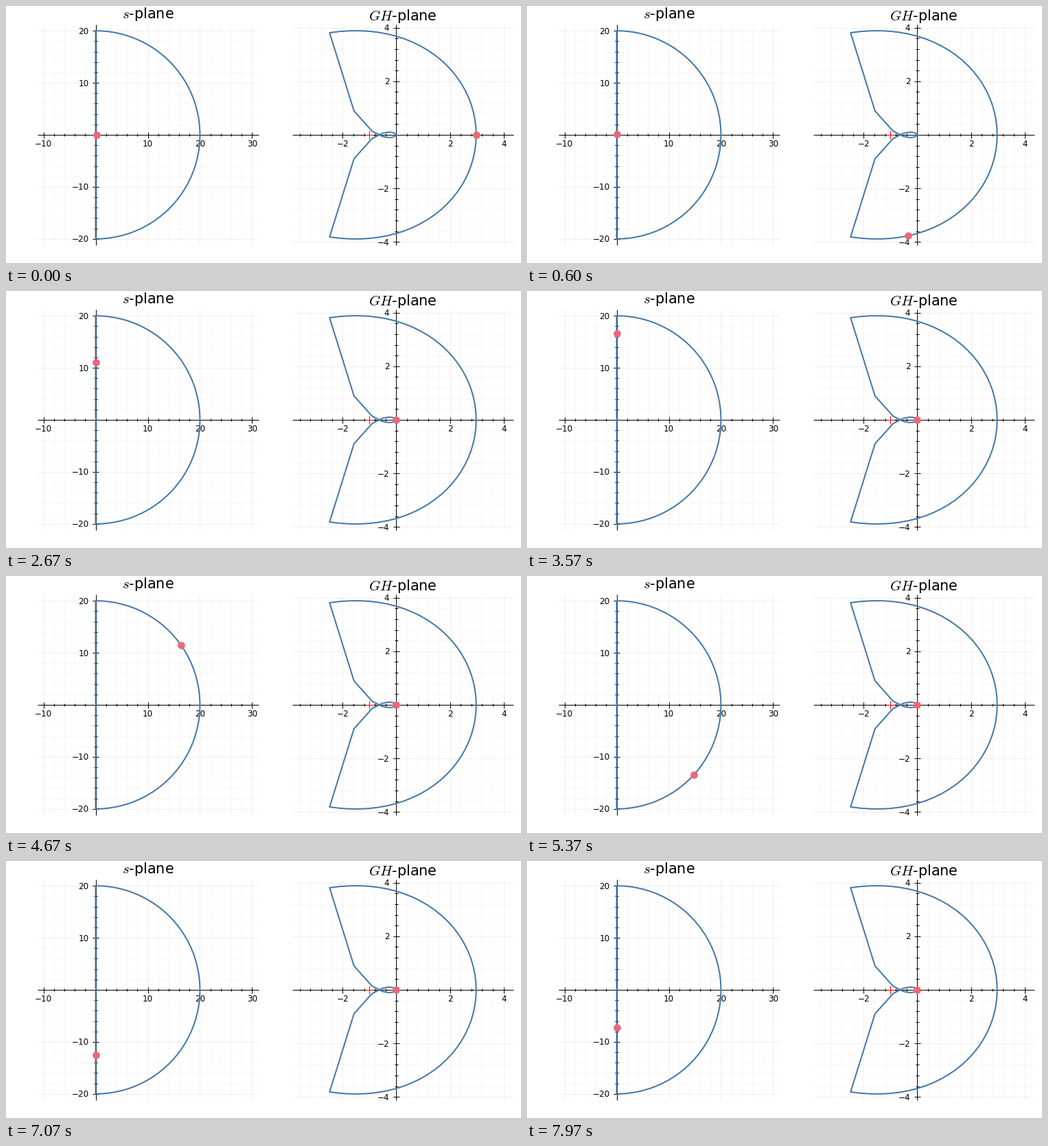
These frames come from a looping animation (750 px wide and 375 px high, 8000 ms). A matplotlib script:

```python
import numpy as np
import matplotlib.pyplot as plt
from matplotlib.animation import FuncAnimation

W, H, DPI = 750, 375, 100
PX = 72 / DPI                 # points per pixel
FRAMES, LOOP_MS = 240, 8000
BLUE, PINK = "#4477AA", "#EE6677"
R_SMALL, R_BIG = 0.2, 20

plt.rcParams.update({"font.family": "DejaVu Sans", "mathtext.fontset": "cm"})


def arc(r, start, stop, n):
    return r * np.exp(1j * np.radians(np.linspace(start, stop, n)))


def rise(start, stop):
    return 1j * np.linspace(start, stop, 50)


def loop_gain(s):
    return 1 / (s * (s + 1) * (2 * s + 1))


class Plane:
    """Square plot with axes through the origin, placed in pixels."""

    def __init__(self, ax, origin, scale, left, step, title, baseline):
        self.ax, self.scale, self.step = ax, scale, step
        self.x0, self.y0 = origin
        self.left, self.right = left, left + 321.9
        self.top, self.bottom = self.y0 - 160.95, self.y0 + 160.95
        self.draw_axes()
        ax.text((self.left + self.right) / 2, baseline, title,
                fontsize=20.8 * PX, ha="center", va="baseline")

    def to_px(self, z):
        return self.x0 + self.scale * np.real(z), self.y0 - self.scale * np.imag(z)

    def line(self, x, y, width=1.0, color="black", **kw):
        self.ax.plot(x, y, color=color, lw=width * PX,
                     solid_capstyle="butt", **kw)

    def ticks(self, low, high):
        """Yield (value, is_major) for each tick inside the limits."""
        for k in range(-20, 21):
            value = k * self.step / 5
            if k and low <= value * self.scale <= high:
                yield value, k % 5 == 0

    def label(self, x, y, value, **kw):
        text = f"{value:.0f}".replace("-", "\u2212")
        self.ax.text(x, y, text, fontsize=12 * PX, zorder=2.5, **kw)

    def draw_axes(self):
        for v, major in self.ticks(self.left - self.x0, self.right - self.x0):
            x = self.x0 + v * self.scale
            half = 4.5 if major else 2.4
            self.line([x, x], [self.top, self.bottom], 0.6,
                      alpha=0.1 if major else 0.05, zorder=1)
            self.line([x, x], [self.y0 - half, self.y0 + half], zorder=2)
            if major:
                self.label(x, 205.4, v, ha="center", va="baseline")
        for v, major in self.ticks(-160.95, 160.95):
            y = self.y0 - v * self.scale
            half = 4.5 if major else 2.4
            self.line([self.left, self.right], [y, y], 0.6,
                      alpha=0.1 if major else 0.05, zorder=1)
            self.line([self.x0 - half, self.x0 + half], [y, y], zorder=2)
            if major:
                self.label(self.x0 - 10, y + 4.5, v, ha="right", va="baseline")
        self.line([self.left, self.right], [self.y0, self.y0], zorder=2)
        self.line([self.x0, self.x0], [self.top, self.bottom], zorder=2)

    def curve(self, z):
        self.line(*self.to_px(z), 2, BLUE, zorder=3, solid_joinstyle="round")

    def dot(self):
        return self.ax.plot([], [], "o", color=PINK, ms=10.6 * PX, mew=0,
                            zorder=5)[0]


contour = np.concatenate([
    arc(R_SMALL, 0, 90, 25),
    rise(R_SMALL, R_BIG / 2),
    rise(R_BIG / 2, R_BIG),
    arc(R_BIG, 90, -90, 50),
    rise(-R_BIG, -R_BIG / 2),
    rise(-R_BIG / 2, -R_SMALL),
    arc(R_SMALL, -90, 0, 25),
])
image = loop_gain(contour)

fig = plt.figure(figsize=(W / DPI, H / DPI), dpi=DPI, facecolor="white")
ax = fig.add_axes([0, 0, 1, 1])
ax.set_xlim(0, W)
ax.set_ylim(H, 0)
ax.axis("off")

s_plane = Plane(ax, (130.6, 188), 7.592, 45.6, 10, "$s$-plane", 18.3)
gh_plane = Plane(ax, (568.4, 188), 39.08, 417.1, 2, "$GH$-plane", 20.7)
s_plane.curve(contour)
gh_plane.curve(image)

# critical point
cx, cy = gh_plane.to_px(-1)
gh_plane.line([cx - 6, cx + 6], [cy, cy], color="red", zorder=4)
gh_plane.line([cx, cx], [cy - 6, cy + 6], color="red", zorder=4)

s_dot, gh_dot = s_plane.dot(), gh_plane.dot()


def update(i):
    for plane, dot, path in ((s_plane, s_dot, contour), (gh_plane, gh_dot, image)):
        x, y = plane.to_px(path[i])
        dot.set_data([x], [y])
    return s_dot, gh_dot


anim = FuncAnimation(fig, update, frames=FRAMES, interval=LOOP_MS / FRAMES,
                     init_func=lambda: update(0), blit=True,
                     repeat=True, repeat_delay=0)
plt.show()
```
